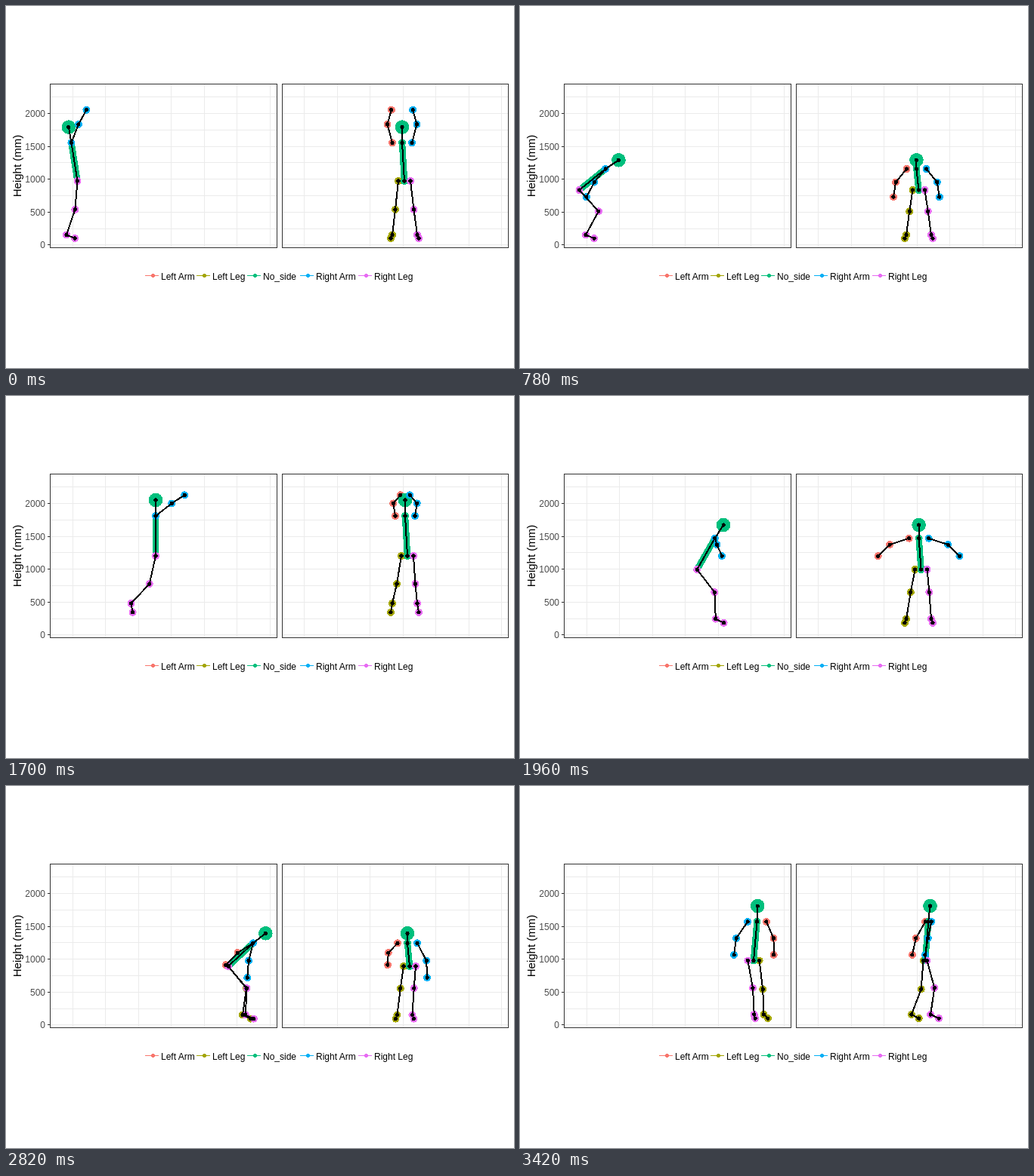
An HTML page for the animation above (3.44 s loop, 672x480 px).

```html
<!DOCTYPE html>
<html lang="en">
<head>
<meta charset="utf-8">
<title>Standing jump, side and front view</title>
<style>
  html, body { margin: 0; width: 100%; height: 100%; overflow: hidden; background: #fff; }
  svg { display: block; font: 12px "Liberation Sans", Arial, sans-serif; shape-rendering: crispEdges; }
</style>
</head>
<body>
<svg width="672" height="480" viewBox="0 0 672 480"><g id="chart"></g><g id="body"></g></svg>
<script>
const DURATION = 3440, STEP = 20;
const UPPER_ARM = 27, FOREARM = 22.5, THIGH = 38, SHANK = 35.5, FOOT = 12, HEAD = 21;
const SHOULDER_HALF = 13, HIP_HALF = 8, FRONT_CENTER = 527.5;
const { sin, cos, hypot, atan2, acos, min, abs, PI } = Math;
const RAD = PI / 180;

// Smooth monotone curve through time, value pairs
function track(...keys) {
  const n = keys.length / 2, time = i => keys[2 * i], value = i => keys[2 * i + 1];
  const slope = i => i < 0 || i > n - 2 ? 0 : (value(i + 1) - value(i)) / (time(i + 1) - time(i));
  const tangent = i => {
    const a = slope(i - 1), b = slope(i);
    return a * b > 0 ? 2 * a * b / (a + b) : 0;
  };
  return t => {
    if (t <= time(0)) return value(0);
    let i = 0;
    while (i < n - 2 && t >= time(i + 1)) i++;
    const span = time(i + 1) - time(i), u = min(1, (t - time(i)) / span), w = 1 - u;
    return value(i) + (value(i + 1) - value(i)) * u * u * (3 - 2 * u)
      + span * u * w * (tangent(i) * w - tangent(i + 1) * u);
  };
}

// Positions in pixels; angles in degrees, positive is forward
const hipX = track(0, 94.5, 540, 91, 780, 78.5, 970, 79, 1240, 101.5, 1400, 134, 1700, 198, 2000, 238, 2300, 257, 2820, 294, 3420, 309);
const hipY = track(0, 232, 540, 233, 780, 244, 1240, 247, 1400, 232, 1700, 212, 2000, 234, 2160, 257, 2300, 246, 2820, 239, 3420, 231.5);
const hipZ = track(0, 527, 1240, 528, 1700, 531, 2300, 530, 2820, 534, 3420, 536);
const lean = track(0, -9, 540, 2, 780, 51, 970, 57, 1240, 38, 1700, 0, 2000, 35, 2300, 72, 2820, 47, 3420, 6);
const armSwing = track(0, 159, 540, 100, 780, -40, 970, -88, 1090, -75, 1240, 14, 1400, 105, 1620, 165, 1700, 128, 1850, 60, 2300, -73, 2820, -36, 3420, -22);
const armTwist = track(2300, 0, 2820, 22, 3420, 0);
const armSpread = track(0, .24, 780, .53, 1240, .46, 1700, .1, 1880, 1, 2300, .43, 3420, .48);
const jumpX = [0, 80, 780, 87, 1240, 86, 1510, 110, 1620, 134, 1700, 165.5, 1850, 232, 2000, 262, 2300, 262.5];
const ankleX = {
  left: track(...jumpX, 2560, 268, 2820, 313, 3420, 296),
  right: track(...jumpX, 2400, 263, 2680, 317, 3420, 316),
};
const ankleY = track(0, 303.5, 1240, 303.5, 1510, 272, 1620, 256, 1700, 275, 1850, 277, 2000, 300, 2300, 304, 3420, 303);
const footAngle = track(0, 68, 1240, 66, 1400, -5, 1510, -20, 1700, 10, 1850, 55, 2000, 65);
const stance = track(2300, 16.5, 2820, 10);
const yaw = track(2840, 0, 3420, 72);

// Joint at a given length and angle from hanging straight down
const swing = ([x, y, z], length, degrees, dz = 0) =>
  [x + length * sin(degrees * RAD), y + length * cos(degrees * RAD), z + dz];

function arm(neck, sign, t) {
  const angle = armSwing(t) + sign * armTwist(t), spread = armSpread(t);
  const bone = (from, length, degrees, out) =>
    swing(from, length * Math.sqrt(1 - out * out), degrees, sign * length * out);
  const shoulder = swing(neck, 0, 0, sign * SHOULDER_HALF);
  const elbow = bone(shoulder, UPPER_ARM, angle, spread);
  return [shoulder, elbow, bone(elbow, FOREARM, angle * .9 + 8, spread * 1.3 - .55)];
}

function leg(pelvis, sign, t) {
  const hip = swing(pelvis, 0, 0, sign * HIP_HALF);
  const ankle = [ankleX[sign < 0 ? 'left' : 'right'](t), ankleY(t), FRONT_CENTER + sign * stance(t)];
  const dx = ankle[0] - hip[0], dy = ankle[1] - hip[1];
  const reach = min(hypot(dx, dy), THIGH + SHANK);
  const bend = acos((THIGH ** 2 + reach ** 2 - SHANK ** 2) / (2 * THIGH * reach));
  const knee = swing(hip, THIGH, (atan2(dx, dy) + bend) / RAD, (ankle[2] - hip[2]) / 2);
  return [hip, knee, ankle, swing(ankle, FOOT, footAngle(t), sign * 2)];
}

function skeleton(t) {
  const pelvis = [hipX(t), hipY(t), hipZ(t)], tilt = lean(t);
  const neck = swing(pelvis, 53 - 11 * abs(sin(tilt * RAD)), 180 - tilt, -3);
  const head = swing(neck, HEAD, 180 - tilt * 1.1);
  return [arm(neck, -1, t), leg(pelvis, -1, t), [head, neck, pelvis], arm(neck, 1, t), leg(pelvis, 1, t)];
}

const limbs = [
  { name: 'Left Arm', color: '#F8766D', keyX: 194 },
  { name: 'Left Leg', color: '#A3A500', keyX: 262 },
  { name: 'No_side', color: '#00BF7D', keyX: 329 },
  { name: 'Right Arm', color: '#00B0F6', keyX: 399 },
  { name: 'Right Leg', color: '#E76BF3', keyX: 476 },
];
const TRUNK = 2;

const line = (points, color, width) =>
  `<polyline points="${points.join(' ')}" fill="none" stroke="${color}" stroke-width="${width}"/>`;
const dot = ([x, y], r, color) => `<circle cx="${x}" cy="${y}" r="${r}" fill="${color}"/>`;
const text = (x, y, label, attrs = '') => `<text x="${x}" y="${y}" ${attrs}>${label}</text>`;

function drawChart() {
  const rowY = i => Math.round(316.3 - i * 21.78) + .5;
  let out = '';
  for (const [left, right, firstGrid] of [[58.5, 358.5, 88.4], [365.5, 664.5, 394.7]]) {
    for (let i = 0; i < 7; i++) {
      const x = Math.floor(firstGrid + i * 43.5) + .5;
      out += line([[x, 103], [x, 320]], '#ebebeb', 1);
    }
    for (let i = 0; i < 10; i++) out += line([[left, rowY(i)], [right, rowY(i)]], '#ebebeb', 1);
    out += `<rect x="${left}" y="103.5" width="${right - left}" height="217" fill="none" stroke="#333"/>`;
  }
  for (let i = 0; i < 5; i++) {
    const y = rowY(2 * i);
    out += line([[55, y], [58, y]], '#333', 1)
      + text(52, y + 4.5, i * 500, 'text-anchor="end" fill="#4d4d4d"');
  }
  out += text(0, 0, 'Height (mm)', 'transform="translate(20 212) rotate(-90)" text-anchor="middle" font-size="15"');
  for (const { name, color, keyX } of limbs)
    out += line([[keyX - 10, 357.5], [keyX + 8, 357.5]], color, 1)
      + dot([keyX + .5, 357.5], 2.6, color) + text(keyX + 11, 363, name);
  document.getElementById('chart').innerHTML = out;
}

function drawFigure(bones, project) {
  let colored = '', black = '';
  limbs.forEach(({ color }, i) => {
    const path = bones[i].map(project);
    if (i === TRUNK) colored += line(path.slice(1), color, 8.5);
    path.forEach((p, j) => colored += dot(p, i === TRUNK && j === 0 ? 9.3 : 5, color));
    black += line(path, '#000', 2) + path.map(p => dot(p, 2.6, '#000')).join('');
  });
  return colored + black;
}

const body = document.getElementById('body');
function frame() {
  const t = Math.floor(performance.now() % DURATION / STEP) * STEP;
  const bones = skeleton(t), [cx, , cz] = bones[TRUNK][2];
  const s = sin(yaw(t) * RAD), c = cos(yaw(t) * RAD);
  const sideView = ([x, y, z]) => [cx + (x - cx) * c - (z - cz) * s, y];
  const frontView = ([x, y, z]) => [cz + (z - cz) * c + (x - cx) * s, y];
  body.innerHTML = drawFigure(bones, sideView) + drawFigure(bones, frontView);
  requestAnimationFrame(frame);
}
drawChart();
frame();
</script>
</body>
</html>
```
